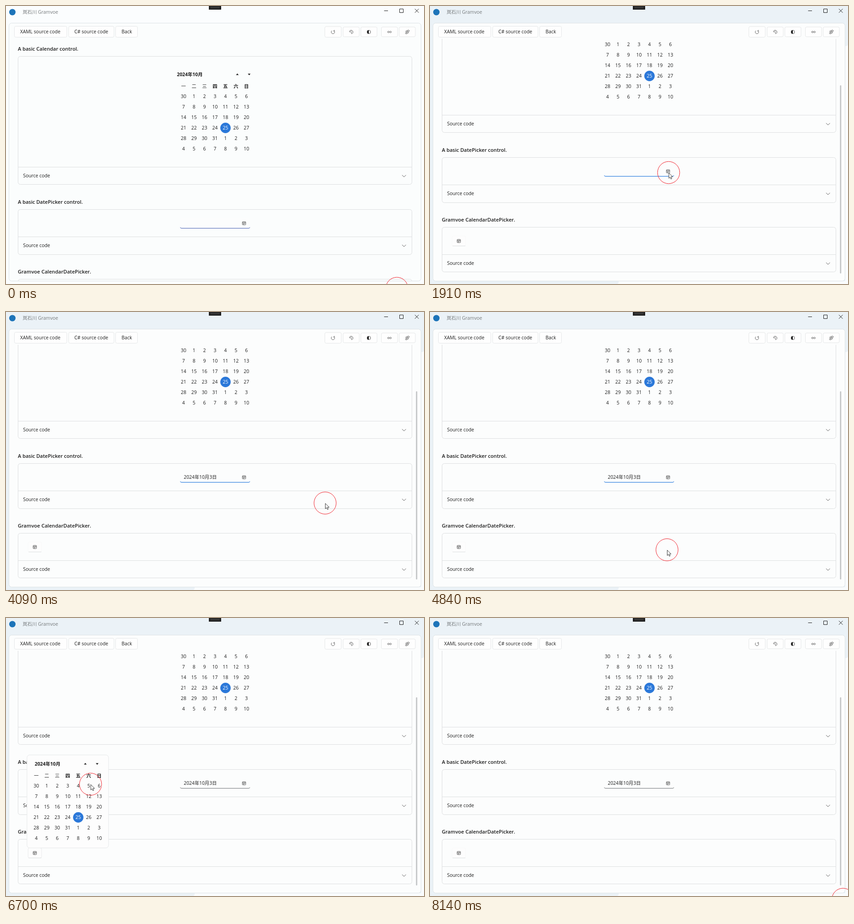
An HTML page for the animation above (8.26 s loop, 917 by 610 pixels).

```html
<!DOCTYPE html>
<html lang="zh">
<head>
<meta charset="utf-8">
<title>Calendar controls</title>
<style>
html, body { margin: 0; width: 100%; height: 100%; overflow: hidden; background: #fbfdfd; }
svg { display: block; width: 917px; height: 610px; }
text { font: 10.35px "Open Sans", "Noto Sans CJK SC", "Noto Sans CJK", sans-serif; fill: #1c1c1c; }
.bold { font-weight: 600; font-size: 11.1px; }
.head { font-weight: 700; font-size: 10.4px; }
.mid { text-anchor: middle; }
.line { fill: none; stroke: #dddfe0; }
.btn { fill: #fefefe; stroke: #e5e7e8; }
.icon { fill: none; stroke: #4a4a4a; stroke-width: .9; }
</style>
</head>
<body>
<svg id="stage" viewBox="0 0 917 610" xmlns="http://www.w3.org/2000/svg"></svg>
<script>
const LOOP = 8260;
const stage = document.getElementById('stage');

const text = (x, y, s, cls = '', extra = '') => `<text x="${x}" y="${y}" class="${cls}" ${extra}>${s}</text>`;
const path = (d, cls = 'icon', extra = '') => `<path d="${d}" class="${cls}" ${extra}/>`;
const rect = (x, y, w, h, r, cls, extra = '') =>
  `<rect x="${x}" y="${y}" width="${w}" height="${h}" rx="${r}" class="${cls}" ${extra}/>`;

// x is the centre of the first column, y the centre of the weekday row
function calendar(x, y, headX, arrowX) {
  let out = text(x + headX, y - 23, '2024年10月', 'head');
  out += path(`M${x + arrowX - 3} ${y - 25}h6l-3-3.4z`, '', 'fill="#1c1c1c"');
  out += path(`M${x + arrowX + 23} ${y - 28}h6l-3 3.4z`, '', 'fill="#1c1c1c"');
  [...'一二三四五六日'].forEach((c, i) => {
    out += text(x + 23 * i, y + 3.8, c, 'mid', `font-weight="700" style="font-weight:${i < 3 ? 500 : 700}"`);
  });
  for (let i = 0; i < 42; i++) {
    const day = i === 0 ? 30 : i < 32 ? i : i - 31;
    const cx = x + 23 * (i % 7), cy = y + 22 + 23 * Math.floor(i / 7);
    const picked = i === 25;
    if (picked) out += `<circle cx="${cx}" cy="${cy}" r="11.4" fill="#2b78d9"/>`;
    out += text(cx, cy + 3.8, day, 'mid', picked ? 'style="fill:#fff"' : '');
  }
  return out;
}

function section(title, titleY, top, split, bottom) {
  return text(26, titleY, title, 'bold') +
    rect(26.5, top, 864, bottom - top, 5, 'line') +
    path(`M26.5 ${split}H890.5`, 'line') +
    text(37.5, split + 22.8, 'Source code') +
    path(`M869 ${split + 17.4}l4.2 4.2 4.2-4.2`);
}

const dateIcon = (x, y) =>
  rect(x - 3.5, y - 3.5, 7.4, 7, 1, 'icon') +
  path(`M${x - 3.5} ${y - 1.4}h7.4M${x - 2} ${y + .4}h4.6M${x - 2} ${y + 2}h2.4`);

const popup = (id, x, y, w, h) =>
  `<g id="${id}">` + rect(x, y, w, h, 6, '', 'fill="#fdfdfd" stroke="#e6e8e9"') +
  calendar(x + 20.5 + (w - 179) / 2, y + 46, -3.5, 107.5) + '</g>';

function toolbar() {
  let out = '';
  [['XAML source code', 18.5, 115, 31], ['C# source code', 137.5, 99.5, 150], ['Back', 240.5, 48, 253.5]]
    .forEach(([s, x, w, tx]) => out += rect(x, 44.5, w, 24, 3, 'btn') + text(tx, 60.3, s));
  [699.5, 739.5, 778.5, 823.5, 862.5].forEach((x, i) =>
    out += rect(x, 45.5 + (i ? .5 : -.5), i ? 35.5 : 36, i ? 21.5 : 23.5, 3, 'btn'));
  out += path('M719.6 54.3A3.7 3.7 0 1 1 715 54.2M720.2 52.6v2.3h-2.3');
  out += path('M753.4 56.2c.6-3 4-4 6.4-2 2.3 2 1.6 5.4-.6 6.4-1.6.6-2-.6-1.6-1.8.5-1.8-.6-2.6-2-2.2-1.2.4-2.2.4-2.2-.4zM756.5 54.8h1.2M759 57h.6');
  out += '<circle cx="796" cy="57" r="3.9" class="icon"/>' + path('M796 53.1a3.9 3.9 0 0 0 0 7.8z', '', 'fill="#222"');
  out += path('M841.3 57c-.8-1.4-1.5-1.7-2.2-1.7a1.7 1.7 0 0 0 0 3.4c.7 0 1.4-.3 2.2-1.7.8-1.4 1.5-1.7 2.2-1.7a1.7 1.7 0 0 1 0 3.4c-.7 0-1.4-.3-2.2-1.7z');
  out += rect(880.6, 53, 4, 3, 1, 'icon') + '<circle cx="878" cy="59.6" r="1.6" class="icon"/>' +
    path('M880.6 54.5h-2.4a1.2 1.2 0 0 0 0 2.4h3.4a1.3 1.3 0 0 1 0 2.7h-2');
  return out;
}

stage.innerHTML = `
<clipPath id="view"><rect x="7" y="72" width="903" height="531"/></clipPath>
<rect id="back" width="917" height="610"/>
<path id="edge" d="M911 88q6 0 6-4V610H411q3-2 3-6H911z" fill="#fafcfd"/>
<circle cx="14" cy="13.5" r="7" fill="#1d74b9"/>
${text(36.5, 16.6, '岚石川 Gramvoe', '', 'style="fill:#767a7c"')}
<rect x="445" width="27" height="8" fill="#1f1f1f"/>
${path('M449 2.5h19M449 4.5h19', 'line', 'stroke-dasharray="1 1" style="stroke:#777"')}
${path('M829.5 10.5h8.5M863.5 6.5h8v8h-8zM897 6.3l8.4 8.4M905.4 6.3l-8.4 8.4', 'icon', 'style="stroke:#1c1c1c;stroke-width:1"')}
<rect id="panel" x="6.5" y="37.5" width="904" height="566" rx="6" stroke="#dde2e5"/>
${toolbar()}
<g clip-path="url(#view)">
  <g id="content">
    ${section('A basic Calendar control.', 97.8, 110.5, 353.5, 391.5)}
    ${calendar(389.5, 176.5, -14.5, 118)}
    ${section('A basic DatePicker control.', 433.6, 446.5, 506.5, 545.5)}
    ${rect(382, 465.5, 153, 22.5, 3, '', 'fill="#fefefe" fill-opacity=".6"')}
    ${path('M382.3 485.6q.6 2 2.6 2H532.4q2 0 2.6-2', '', 'id="field" fill="none" stroke-width="1.1"')}
    ${dateIcon(522, 476.7)}
    ${text(390, 479.6, '2024年10月3日', '', 'id="date"')}
    ${section('Gramvoe CalendarDatePicker.', 587.4, 599.5, 659.5, 697.5)}
  </g>
  <rect id="thumb" x="899.4" width="2.8" height="413" rx="1.4" fill="#c3c5c6"/>
</g>
${popup('pop1', 519.5, 359.5, 183, 205)}
${popup('pop2', 46, 300.5, 179, 204)}
<g clip-path="url(#view)"><g id="picker">
  ${rect(48.5, 618.5, 29.5, 22, 3, '', 'id="pick" fill="#fdfdfd"')}
  ${path('M49.5 640.5H77.5', 'line')}
  ${dateIcon(63, 629.7)}
</g></g>
<g id="mouse">
  <circle r="24.3" fill="none" stroke="#f0202a"/>
  <path id="arrow" d="M.5.8V12.6L3.2 10.1 5 14.2 7 13.3 5.2 9.3H8.9Z" fill="#fff" stroke="#222" stroke-width=".9"/>
  <path id="hand" d="M4 10V1.8a1.3 1.3 0 0 1 2.6 0V7l4.9 1c1.4.4 2 1.2 1.8 2.6l-.8 4.4-1.2 2.9H6L1.2 11.8c-.6-1.3.8-2.1 1.7-1.3L4 11.6M8.8 7.6v2.2M11 8v2" fill="#fff" stroke="#222" stroke-width=".9"/>
</g>`;

const el = {};
stage.querySelectorAll('[id]').forEach(n => el[n.id] = n);
const set = (id, attrs) => Object.entries(attrs).forEach(([k, v]) => el[id].setAttribute(k, v));
const show = (id, on) => set(id, { visibility: on ? 'visible' : 'hidden' });

// time, x, y of the pointer
const TRACK = [
  [0, 857.5, 619.5], [330, 857.5, 619.5], [700, 632, 273.3], [930, 632, 273.3],
  [1250, 680, 330], [1750, 523.5, 361], [1910, 523.5, 365.5], [2060, 523.5, 367],
  [2160, 523.5, 367], [2500, 560, 395], [2870, 523, 363.5], [3320, 523, 363.5],
  [3700, 609, 429], [3940, 609, 429], [4090, 700, 419.2], [4250, 716, 408],
  [4790, 540, 520], [5200, 300, 541], [5570, 68, 513.2], [5620, 68, 513.2],
  [6450, 180, 360], [6700, 185.5, 364.7], [7000, 184, 367], [7100, 184, 367],
  [7920, 893, 614.5], [8140, 906, 617.3], [LOOP, 906, 617.3]
];

function pointer(t) {
  const i = TRACK.findIndex(k => k[0] > t);
  const [a, b] = [TRACK[i - 1], TRACK[i]];
  let p = (t - a[0]) / (b[0] - a[0]);
  p = (p + p * p * (3 - 2 * p)) / 2;
  return [a[1] + (b[1] - a[1]) * p, a[2] + (b[2] - a[2]) * p];
}

const fade = (t, from, to) => t < from || t >= to ? 0 : Math.min(1, .5 + (t - from) / 100);

function draw(t) {
  const active = t >= 1300;
  const scroll = t < 680 ? 0 : t < 730 ? 48 : t < 780 ? 96 : 114;
  const [x, y] = pointer(t);
  const over = x > 44 && x < 82 && y > 503 && y < 528;
  const pop1 = fade(t, 3120, 3750), pop2 = fade(t, 5700, 6950);

  set('back', { fill: active ? '#ebf2f7' : '#fbfdfe' });
  show('edge', active);
  set('panel', { fill: active || scroll ? '#fcfdfd' : '#fbfdfd' });

  set('content', { transform: `translate(0 ${-scroll})` });
  set('picker', { transform: `translate(0 ${-scroll})` });
  show('thumb', scroll > 0);
  set('thumb', { y: 81 + scroll * 93 / 114 });

  set('field', { stroke: t < 380 ? '#5f74bd' : active && t < 5500 ? '#2f7fde' : '#85888a' });
  show('date', t >= 3750);
  set('pick', over
    ? { x: 46, width: 35, stroke: '#c9cbcc' }
    : { x: 48.5, width: 29.5, stroke: pop2 ? '#e9eaeb' : '#f8f9f9' });

  show('pop1', pop1 > 0);
  set('pop1', { opacity: pop1 });
  show('pop2', pop2 > 0);
  set('pop2', { opacity: pop2 });

  set('mouse', { transform: `translate(${x.toFixed(2)} ${y.toFixed(2)})` });
  show('arrow', !over);
  show('hand', over);
}

function tick() {
  draw(performance.now() % LOOP);
  requestAnimationFrame(tick);
}
tick();
</script>
</body>
</html>
```
